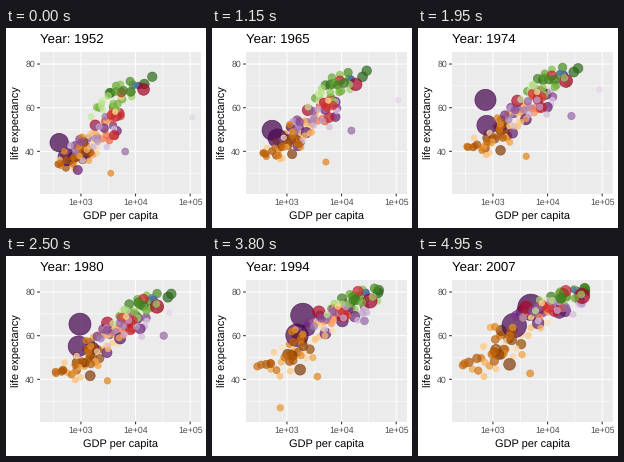
These frames come from a looping animation (200x200 px, 5000 ms). A matplotlib script:

```python
import matplotlib.pyplot as plt
import numpy as np
from matplotlib.animation import FuncAnimation
from matplotlib.colors import to_rgb
from matplotlib.patches import Rectangle

plt.rcParams["font.family"] = "Liberation Sans"
plt.rcParams["text.hinting"] = "none"

SIZE, DPI = 200, 100
PT = 72 / DPI                      # points per pixel
FRAMES, INTERVAL = 100, 50
YEARS = np.arange(1952, 2008, 5)
PROGRESS = np.linspace(0, 1, len(YEARS))

# Panel edges in pixels and the data range they span
LEFT, RIGHT, TOP, BOTTOM = 33.9, 194.5, 23.9, 165.6
X_LOW, X_HIGH = 2.2487, 5.1887
Y_LOW, Y_HIGH = 20.649, 85.553
POP_MAX = 1319

# Countries that stand out: final population in millions,
# then key points of (year, income, life expectancy)
LANDMARKS = {
    "Asia": {
        "China": (1319, (1952, 400, 44), (1957, 576, 50.5), (1962, 488, 44.5),
                  (1972, 677, 63.1), (1992, 1656, 68.7), (2007, 4959, 73)),
        "India": (1110, (1952, 547, 37.4), (1977, 813, 54.2), (2007, 2452, 64.7)),
        "Indonesia": (223, (1952, 750, 37.5), (2007, 3541, 70.7)),
        "Kuwait": (2.5, (1952, 108382, 55.6), (1972, 109348, 67.7),
                   (1982, 31354, 71.3), (2007, 47307, 77.6)),
        "Saudi Arabia": (28, (1952, 6460, 39.9), (1977, 34168, 58.7), (2007, 21655, 72.8)),
    },
    "Africa": {
        "Angola": (12, (1952, 3521, 30), (1967, 5523, 36), (1982, 2757, 39.9),
                   (2007, 4797, 42.7)),
        "Nigeria": (135, (1952, 1077, 36.3), (2007, 2014, 46.9)),
        "Rwanda": (9, (1952, 493, 40), (1987, 848, 44), (1992, 737, 23.6), (2007, 863, 46.2)),
    },
    "Americas": {
        "United States": (301, (1952, 13990, 68.4), (2007, 42952, 78.2)),
    },
}

# How each region drifts from start to end: log income and life expectancy with
# their deviations; lean ties wealth to population; top and decay set populations
REGIONS = {
    "Africa": dict(count=52, top=90, decay=12, growth=3.5, lean=0,
                   income=(2.97, 3.17), income_sd=(.24, .42), life=(39.5, 56), life_sd=(4.8, 8),
                   shades="#7F3B08 #B35806 #E08214 #FDB863 #FEE0B6"),
    "Americas": dict(count=25, top=190, decay=4.5, growth=2.2, lean=.5,
                     income=(3.47, 3.9), income_sd=(.2, .24), life=(53, 73.5), life_sd=(8, 3.5),
                     shades="#A50026 #D73027 #F46D43 #FDAE61 #FEE090"),
    "Asia": dict(count=33, top=170, decay=6.5, growth=2.5, lean=-.3,
                 income=(3.25, 4), income_sd=(.3, .46), life=(47, 72.5), life_sd=(8, 5),
                 shades="#40004B #762A83 #9970AB #C2A5CF #E7D4E8"),
    "Europe": dict(count=30, top=82, decay=9, growth=1.3, lean=.7,
                   income=(3.68, 4.35), income_sd=(.26, .28), life=(65, 77.5), life_sd=(5, 2.8),
                   shades="#276419 #4D9221 #7FBC41 #B8E186 #E6F5D0"),
    "Oceania": dict(count=2, top=20, decay=.63, growth=2.1, lean=1,
                    income=(4, 4.47), income_sd=(.01, .08), life=(69.2, 80.7), life_sd=(.2, .5),
                    shades="#313695 #4575B4"),
}

rng = np.random.default_rng(52)


def normal():
    return np.clip(rng.normal(), -1.9, 1.9)


def blend(ends, t):
    return ends[0] + (ends[1] - ends[0]) * t


def landmark(name, pop, *path):
    when, income, life = np.array(path).T
    return dict(name=name, pop=pop,
                income=np.interp(YEARS, when, np.log10(income)),
                life=np.interp(YEARS, when, life))


def typical(region, rank, total):
    """A country that follows its region's trend with its own luck."""
    share = rank / max(total - 1, 1)
    start, drift, health = normal(), normal(), normal()
    wealth = region["lean"] * (1 - 2 * share) + blend((.85 * start, .6 * start + .6 * drift), PROGRESS)
    fitness = .72 * wealth + .62 * health
    eased = 1 - (1 - PROGRESS) ** 1.5
    income = blend(region["income"], eased) + wealth * blend(region["income_sd"], PROGRESS)
    life = blend(region["life"], eased) + fitness * blend(region["life_sd"], PROGRESS)
    wobble = rng.normal(size=(2, len(YEARS)))
    return dict(name=chr(rng.integers(65, 91)),
                pop=region["top"] * np.exp(-rank / region["decay"]),
                income=np.clip(income + .025 * wobble[0], 2.45, 4.68),
                life=np.clip(life + .4 * wobble[1], 29, 82))


def shade(anchors, t):
    rgb = np.array([to_rgb(c) for c in anchors.split()])
    stops = np.linspace(0, 1, len(rgb))
    return [np.interp(t, stops, channel) for channel in rgb.T]


def build_region(name, region):
    members = [landmark(n, *v) for n, v in LANDMARKS.get(name, {}).items()]
    rest = region["count"] - len(members)
    members += [typical(region, rank, rest) for rank in range(rest)]
    members.sort(key=lambda c: -c["pop"])
    for i, c in enumerate(members):
        c["color"] = (*shade(region["shades"], i / (len(members) - 1)), 0.7)
        c["growth"] = region["growth"]
    return members


def to_x(log_income):
    return LEFT + (log_income - X_LOW) / (X_HIGH - X_LOW) * (RIGHT - LEFT)


def to_y(life):
    return BOTTOM - (life - Y_LOW) / (Y_HIGH - Y_LOW) * (BOTTOM - TOP)


def marker_area(pop):
    size = 2 + 10 * np.sqrt(np.clip(pop / POP_MAX, 0, 1))
    diameter = 0.75 * (size * 2.845 + 0.945)
    return (diameter * PT) ** 2


countries = sorted((c for item in REGIONS.items() for c in build_region(*item)),
                   key=lambda c: c["name"])
xs = to_x(np.array([c["income"] for c in countries]))
ys = to_y(np.array([c["life"] for c in countries]))
final_pop = np.array([c["pop"] for c in countries])
growth = np.array([c["growth"] for c in countries])
colors = [c["color"] for c in countries]

fig = plt.figure(figsize=(SIZE / DPI, SIZE / DPI), dpi=DPI, facecolor="white")
ax = fig.add_axes([0, 0, 1, 1])
ax.set_xlim(0, SIZE)
ax.set_ylim(SIZE, 0)
ax.axis("off")


def line(x, y, color, width):
    ax.plot(x, y, color=color, lw=width * PT, solid_capstyle="butt", snap=False, zorder=1)


def label(x, y, text, size, color="black", ha="center", rotation=0):
    return ax.text(x, y, text, fontsize=size * PT, color=color, ha=ha, va="baseline",
                   rotation=rotation, rotation_mode="anchor")


ax.add_patch(Rectangle((LEFT, TOP), RIGHT - LEFT, BOTTOM - TOP, fc="#EBEBEB", lw=0, zorder=0))
for v in (2.5, 3.5, 4.5):
    line([to_x(v)] * 2, [TOP, BOTTOM], "white", 0.53)
for v in (30, 50, 70):
    line([LEFT, RIGHT], [to_y(v)] * 2, "white", 0.53)
for v in (3, 4, 5):
    x = to_x(v)
    line([x, x], [TOP, BOTTOM], "white", 1.07)
    line([x, x], [BOTTOM, BOTTOM + 2.75], "#333333", 1.07)
    label(x, 177.3, f"1e+0{v}", 8.8, "#4D4D4D")
for v in (40, 60, 80):
    y = to_y(v)
    line([LEFT, RIGHT], [y, y], "white", 1.07)
    line([LEFT - 2.75, LEFT], [y, y], "#333333", 1.07)
    label(LEFT - 4.95, y + 3.15, str(v), 8.8, "#4D4D4D", ha="right")

label((LEFT + RIGHT) / 2, 191.8, "GDP per capita", 11)
label(13.4, (TOP + BOTTOM) / 2, "life expectancy", 11, rotation=90)
title = label(LEFT, 15.2, "Year: 1952", 13.2, ha="left")
dots = ax.scatter(xs[:, 0], ys[:, 0], s=marker_area(final_pop / growth), facecolors=colors,
                  edgecolors=colors, linewidths=0.71 * PT, zorder=2)


def draw(frame):
    t = frame / (FRAMES - 1)
    pos = t * (len(YEARS) - 1)
    i = min(int(pos), len(YEARS) - 2)
    x = blend((xs[:, i], xs[:, i + 1]), pos - i)
    y = blend((ys[:, i], ys[:, i + 1]), pos - i)
    dots.set_offsets(np.column_stack([x, y]))
    dots.set_sizes(marker_area(final_pop * growth ** (t - 1)))
    title.set_text(f"Year: {round(1952 + 55 * t)}")
    return dots, title


anim = FuncAnimation(fig, draw, frames=FRAMES, interval=INTERVAL, repeat=True, blit=False)
plt.show()
```
